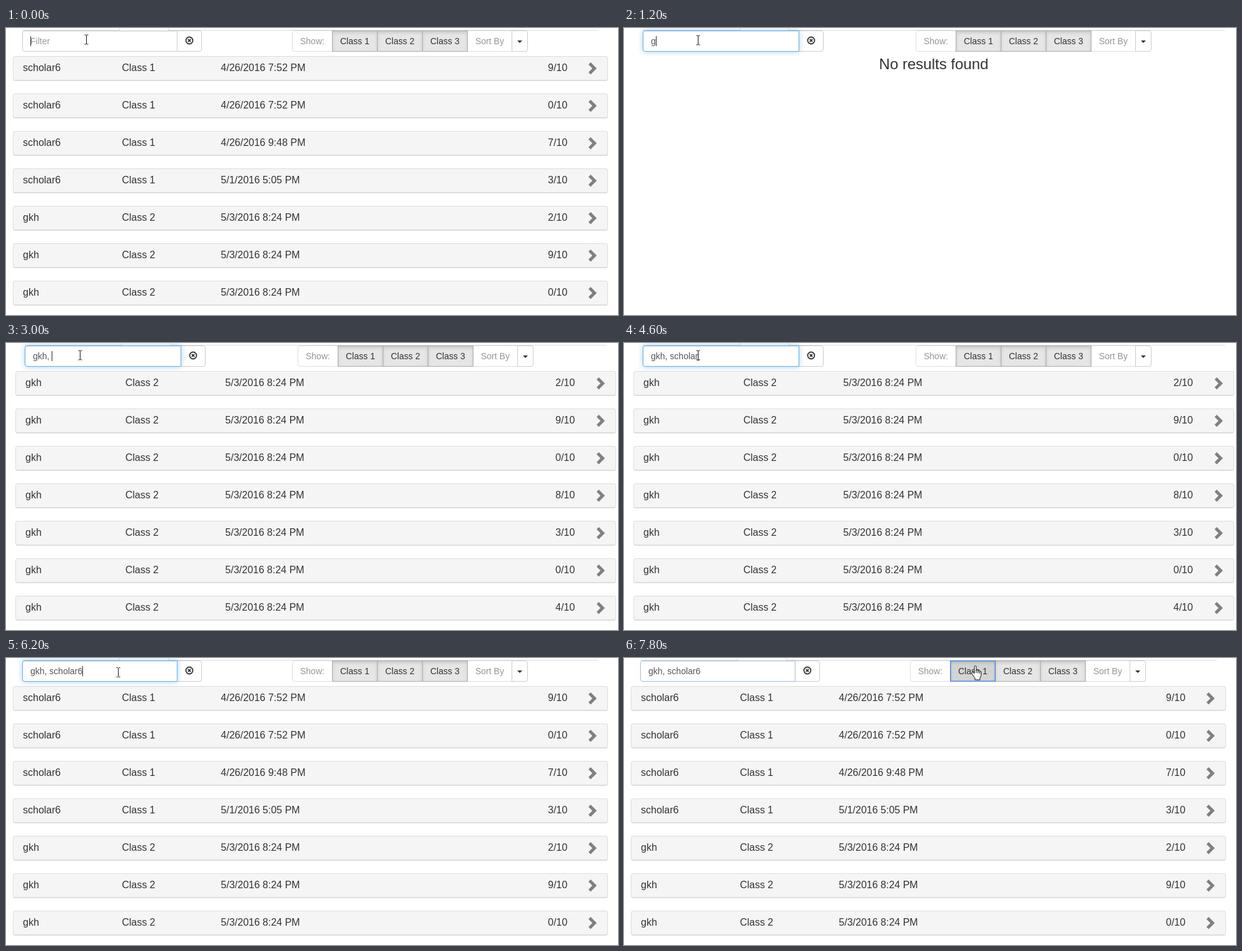
These frames come from a looping animation (978x460 px, 8 s). An HTML page:

```html
<!DOCTYPE html>
<html lang="en">
<head>
<meta charset="utf-8">
<title>Filter list</title>
<style>
html, body { margin: 0; width: 100%; height: 100%; overflow: hidden; background: #fff; }
#stage {
  --left: 11px; --width: 951px; --bar: 26px; --field: 248px; --tab: 181px;
  --group: 457px; --col: 158.17px; --score: 855px; --arrow: 919px; --line: 921px;
  position: relative; width: 978px; height: 460px; overflow: hidden;
  font: 14px/20px "Liberation Sans", Arial, sans-serif; color: #333;
}
#stage.wide {
  --left: 15px; --width: 960px; --bar: 30px; --field: 250px; --tab: 185px;
  --group: 466px; --col: 159.67px; --score: 863px; --arrow: 927.5px; --line: 930px;
}
#stage * { box-sizing: border-box; }
#stage div, #stage svg { position: absolute; }
.rule { left: var(--bar); top: 3px; width: var(--line); height: 1px; background: #ddd; }
.tab { left: var(--tab); top: 0; width: 79px; height: 4px; background: #fff; border: solid #ddd; border-width: 0 1px; }
#stage .field {
  left: var(--bar); top: 4px; width: var(--field); height: 34px; z-index: 2;
  display: flex; align-items: center; padding: 0 12px;
  background: #fff; border: 1px solid #ccc; border-radius: 4px 0 0 4px; color: #555; white-space: pre;
}
.caret { width: 1px; height: 16px; margin-right: -1px; background: #222; }
.hint { color: #999; }
.clear {
  left: calc(var(--bar) + var(--field) - 1px); top: 4px; width: 40px; height: 34px;
  border: 1px solid #ccc; border-radius: 0 4px 4px 0;
}
.clear svg { left: 12px; top: 8px; }
.group { left: var(--group); top: 4px; }
.btn { top: 0; height: 34px; padding: 6px 12px; border: 1px solid #ccc; background: #fff; white-space: nowrap; }
.btn.dim { color: #959595; border-color: #dedede; }
.btn.on { z-index: 1; background: #e6e6e6; border-color: #adadad; box-shadow: inset 0 3px 5px rgba(0,0,0,.125); }
.btn.hover { z-index: 2; background: #d4d4d4; border-color: #8c8c8c; }
.btn.focus { z-index: 3; border-color: #4d8ae0; box-shadow: inset 0 0 1px 1px rgba(77,144,254,.5), inset 0 3px 5px rgba(0,0,0,.125); }
.btn i { position: absolute; left: 8px; top: 15px; border: 4px solid transparent; border-top-color: #333; border-bottom: 0; }
.row {
  left: var(--left); width: var(--width); height: 40px; font-size: 16px;
  background: #f5f5f5; border: 1px solid #ddd; border-bottom-width: 2px; border-radius: 4px;
}
.row div { top: 8px; white-space: nowrap; }
.row svg { left: calc(var(--arrow) - 1px); top: 9px; }
.none { left: var(--left); width: var(--width); top: 44px; font-size: 24px; line-height: 28px; text-align: center; }
#cursor { z-index: 9; left: 0; top: 0; }
</style>
</head>
<body>
<div id="stage">
  <div class="rule"></div>
  <div class="tab"></div>
  <div class="field"><span id="text"></span><span class="caret" id="caret"></span><span class="hint" id="hint">Filter</span></div>
  <div class="clear">
    <svg width="14" height="14" fill="none" stroke="#333" stroke-width="1.8">
      <circle cx="7" cy="7" r="5.5"/><path d="M4.8 4.8l4.4 4.4M9.2 4.8l-4.4 4.4"/>
    </svg>
  </div>
  <div class="group" id="group"></div>
  <div id="list"></div>
  <svg id="cursor" width="978" height="460">
    <g id="beam" fill="none" stroke="#111">
      <path d="M-3 -7.5h2l1 1 1-1h2M0 -6.5V6.5M-3 7.5h2l1-1 1 1h2"/>
    </g>
    <g id="arrow" fill="#fff" stroke="#111">
      <path d="M.5.5V16.5l3.7-3.5 2.5 6 2.5-1-2.5-5.8h5z"/>
    </g>
    <g id="hand" fill="#fff" stroke="#111" stroke-linejoin="round">
      <path d="M-1.5 13V2a1.5 1.5 0 0 1 3 0V8.3a1.4 1.4 0 0 1 2.8.3v.6a1.3 1.3 0 0 1 2.6.3v.7a1.2 1.2 0 0 1 2.4.4v5.2l-2 4.4v2.8H-.5v-2.6L-5.8 13a1.5 1.5 0 0 1 2.3-1.9z"/>
      <path d="M1.5 8v4M4.3 9v3.5M6.9 10v3" fill="none"/>
    </g>
  </svg>
</div>
<script>
const LOOP = 8000;
const $ = id => document.getElementById(id);
const SHORT = "gkh", LONG = "scholar6";
const both = n => SHORT + ", " + LONG.slice(0, n);

// name, class, date, score
const late = score => [SHORT, "Class 2", "5/3/2016 8:24 PM", score];
const early = (date, score) => [LONG, "Class 1", date, score];
const lists = {
  all: [
    early("4/26/2016 7:52 PM", 9), early("4/26/2016 7:52 PM", 0),
    early("4/26/2016 9:48 PM", 7), early("5/1/2016 5:05 PM", 3),
    ...[2, 9, 0].map(late)
  ],
  some: [2, 9, 0, 8, 3, 0, 4].map(late),
  none: []
};

// Each step changes only what it names.
const steps = [
  { at: 0, text: "", list: "all", caret: 1, glow: 0, cur: "beam", x: 128.5, y: 18.5, hover: 0, focus: 0 },
  { at: 200, glow: 0.6 },
  { at: 400, glow: 1 },
  { at: 800, x: 122.5, y: 18.5 },
  { at: 1000, text: SHORT.slice(0, 1), x: 118.5, y: 19.5 },
  { at: 1200, list: "none" },
  { at: 1400, text: SHORT.slice(0, 2) },
  { at: 1600, text: SHORT },
  { at: 1800, list: "some" },
  { at: 2400, caret: 0 },
  { at: 2600, caret: 1, text: SHORT + "," },
  { at: 3000, text: both(0) },
  { at: 3600, text: both(1) },
  { at: 4000, text: both(5) },
  { at: 4400, text: both(6) },
  { at: 4600, text: both(7) },
  { at: 5200, text: both(8), list: "all", x: 122.5, y: 18.5 },
  { at: 5600, x: 152.5, y: 20.5 },
  { at: 5800, x: 179.5, y: 23, caret: 0 },
  { at: 6200, caret: 1 },
  { at: 6600, x: 224.5, y: 24 },
  { at: 6800, cur: "arrow", x: 338, y: 20 },
  { at: 7000, x: 442, y: 20 },
  { at: 7200, cur: "hand", x: 574, y: 19, hover: 1 },
  { at: 7400, x: 622.5, y: 18.5, hover: 2 },
  { at: 7600, x: 561.5, y: 12, hover: 1 },
  { at: 7800, caret: 0, glow: 0.4, focus: 1 }
];
const states = [];
steps.forEach((s, i) => states.push({ ...states[i - 1], ...s }));

function add(parent, cls, left, html) {
  const el = document.createElement("div");
  el.className = cls;
  el.style.left = left;
  el.innerHTML = html;
  parent.append(el);
  return el;
}

const buttons = [
  ["Show:", "btn dim", 0, 65], ["Class 1", "btn on", 64, 73], ["Class 2", "btn on", 136, 73],
  ["Class 3", "btn on", 208, 73], ["Sort By", "btn dim", 280, 72], ["<i></i>", "btn", 351, 26]
].map(([label, cls, x, w]) => {
  const el = add($("group"), cls, x + "px", label);
  el.style.width = w + "px";
  return el;
});
buttons[0].style.borderRadius = "4px 0 0 4px";
buttons[5].style.borderRadius = "0 4px 4px 0";

const chevron = '<svg width="15" height="20"><path fill="#808080" d="M4.3 0L14 9.7 4.3 19.4.8 15.9 7 9.7.8 3.5z"/></svg>';

function fill(name) {
  const box = $("list");
  box.textContent = "";
  $("stage").classList.toggle("wide", name !== "all");
  if (name === "none") add(box, "none", "", "No results found");
  lists[name].forEach(([who, group, date, score], i) => {
    const row = add(box, "row", "", chevron);
    row.style.top = 45 + i * 60 + "px";
    [who, group, date].forEach((s, k) => add(row, "", `calc(15px + ${k} * var(--col))`, s));
    add(row, "", "calc(var(--score) - 1px)", score + "/10");
  });
}

const mix = (a, b, k) => Math.round(a + (b - a) * k);
const field = document.querySelector(".field");
let last = null;

function show(s) {
  if (!last || last.list !== s.list) fill(s.list);
  $("text").textContent = s.text;
  $("hint").style.display = s.text ? "none" : "";
  $("caret").style.visibility = s.caret ? "visible" : "hidden";
  field.style.borderColor = `rgb(${mix(204, 102, s.glow)},${mix(204, 175, s.glow)},${mix(204, 233, s.glow)})`;
  field.style.boxShadow = `inset 0 1px 1px rgba(0,0,0,.075), 0 0 8px rgba(102,175,233,${0.6 * s.glow * s.glow})`;
  buttons.forEach((b, i) => {
    b.classList.toggle("hover", i > 0 && i === s.hover);
    b.classList.toggle("focus", i > 0 && i === s.focus);
  });
  for (const id of ["beam", "arrow", "hand"]) {
    $(id).style.display = id === s.cur ? "" : "none";
    $(id).setAttribute("transform", `translate(${s.x} ${s.y})`);
  }
  last = s;
}

const start = performance.now();
function tick() {
  const t = (performance.now() - start) % LOOP;
  const s = states.findLast(k => k.at <= t) || states[0];
  if (s !== last) show(s);
  requestAnimationFrame(tick);
}
tick();
</script>
</body>
</html>
```
